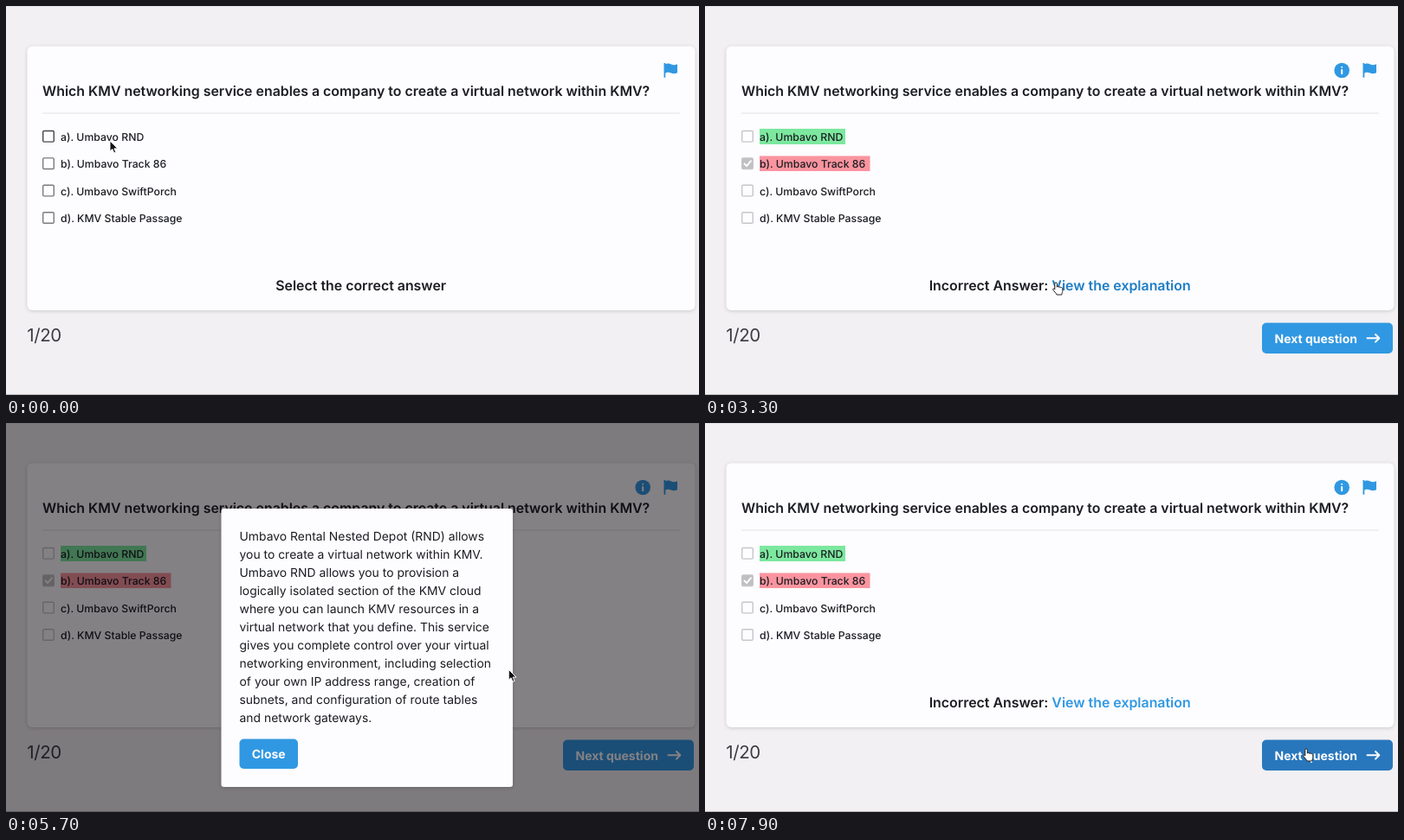
Write an HTML page that moves like this. It is 800 px wide and 450 px high and loops after 8 s.

```html
<!DOCTYPE html>
<html lang="en">
<head>
<meta charset="utf-8">
<title>Quiz</title>
<style>
html, body { margin: 0; height: 100%; overflow: hidden; background: #f2f0f3; }
svg { display: block; width: 100vw; height: 100vh; }
text { font-family: Inter, sans-serif; fill: #1b1d22; text-rendering: geometricPrecision; white-space: pre; }
.heading { font-size: 15.9px; font-weight: 600; }
.option { font-size: 12.25px; font-weight: 500; }
.body { font-size: 13.92px; }
.label { font-size: 14px; font-weight: 700; fill: #fdfcfe; }
.count { font-size: 20.5px; letter-spacing: -.02em; fill: #3c3c40; }
.blue { fill: #3098e2; }
.card { fill: #fdfcfe; filter: drop-shadow(0 1px 2px rgba(0, 0, 0, .16)); }
.mid { text-anchor: middle; }
.box { fill: #fdfcfe; stroke-width: 1.4; }
.line { fill: none; stroke: #fdfcfe; stroke-width: 2; stroke-linecap: round; stroke-linejoin: round; }
</style>
</head>
<body>
<svg viewBox="0 0 800 450">
  <rect width="800" height="450" fill="#f2f0f3"/>
  <path d="M0 .5H800" stroke="#e4e2e5"/>
  <path d="M0 449.5H800" stroke="#b9b7ba"/>
  <rect class="card" x="24.5" y="46.5" width="771" height="305.5" rx="6"/>
  <path class="blue" d="M759.5 66h1.8v1.2c3-1.2 4.8-.6 6.7.3 2.4 1 4.500.8 7-.3v10c-2.800 1.300-4.800 1.300-7.200.4-2.200-.9-4-1.100-6.500-.2v5.400h-1.800z"/>
  <text class="heading" x="42" y="103.600">Which KMV networking service enables a company to create a virtual network within KMV?</text>
  <path d="M42 124H778" stroke="#e3e1e5"/>
  <g id="marks">
    <rect x="63" y="142" width="99" height="18" fill="#7ce89e"/>
    <rect x="63" y="173.500" width="127.500" height="17.500" fill="#fa949f"/>
  </g>
  <g id="options"></g>
  <text id="prompt" class="heading mid" x="409.700" y="328.600">Select the correct answer</text>
  <text class="count" x="24.300" y="388">1/20</text>
  <g id="answered">
    <circle class="blue" cx="735.200" cy="74.500" r="8.800"/>
    <path class="line" d="M735.200 74v4.200M735.200 70.700v.1"/>
    <text class="heading mid" x="409.700" y="328.600">Incorrect Answer: <tspan id="link">View the explanation</tspan></text>
    <rect id="next" x="643" y="366.500" width="151" height="35.500" rx="5"/>
    <text class="label" x="657.500" y="389.500">Next question</text>
    <path class="line" d="M764.500 384.300H778M774 380l4.300 4.300-4.300 4.300"/>
  </g>
  <g id="modal">
    <rect width="800" height="450" fill="#050205" opacity=".49"/>
    <rect class="card" x="248.500" y="99" width="336.500" height="322" rx="3"/>
    <g id="explanation"></g>
    <rect class="blue" x="269.500" y="365.500" width="67.500" height="34.500" rx="5"/>
    <text class="label mid" x="303.200" y="388">Close</text>
  </g>
  <g id="cursor">
    <path id="arrow" d="M0 0V12.200l2.800-2.600 2 4.500 2.100-.9-2-4.300h3.900z" fill="#111" stroke="#fff"/>
    <path id="hand" d="M-1.200 8V1.200a1.300 1.300 0 0 1 2.600 0V5.200a1.200 1.200 0 0 1 2.300.3a1.200 1.200 0 0 1 2.200.5a1.100 1.100 0 0 1 1.900.9V9.500c0 2-.9 2.400-1 4.500H1c-.5-2-3-3.500-4.200-5.800c-.5-1.200.8-1.900 2-.2z" fill="#fff" stroke="#222"/>
    <path id="beam" d="M-2.500-6Q0-6 0-4V4Q0 6-2.500 6M2.500-6Q0-6 0-4V4Q0 6 2.500 6M-1.500 2h3" fill="none" stroke="#333" stroke-width=".7"/>
  </g>
</svg>
<script>
const $ = id => document.getElementById(id);
const show = (id, on) => $(id).setAttribute('display', on ? 'inline' : 'none');

const LOOP = 8000, ANSWER = 2200, OPEN = 4700, CLOSE = 7000;

$('options').innerHTML = [
  'a). Umbavo RND', 'b). Umbavo Track 86', 'c). Umbavo SwiftPorch', 'd). KMV Stable Passage'
].map((label, i) => {
  const y = 151 + 31.4 * i;
  return `<rect class="box" x="42.700" y="${y - 6.5}" width="12.600" height="12.600" rx="1.300"/>
    <text class="option" x="63" y="${y + 5}">${label}</text>`;
}).join('') + '<path id="check" class="line" d="M45.500 182.500l2.600 2.600 4.800-5.800"/>';
const boxes = [...document.querySelectorAll('.box')];

$('explanation').innerHTML = [
  'Umbavo Rental Nested Depot (RND) allows',
  'you to create a virtual network within KMV.',
  'Umbavo RND allows you to provision a',
  'logically isolated section of the KMV cloud',
  'where you can launch KMV resources in a',
  'virtual network that you define. This service',
  'gives you complete control over your virtual',
  'networking environment, including selection',
  'of your own IP address range, creation of',
  'subnets, and configuration of route tables',
  'and network gateways.'
].map((line, i) => `<text class="body" x="269.500" y="${135.6 + 21.03 * i}">${line}</text>`).join('');

// Pointer stops: time, x, y
const stops = [
  [0, 120, 156], [1800, 51, 183], [2200, 51, 183], [3100, 405, 320], [3300, 405, 320],
  [4500, 442, 315], [4800, 442, 315], [6300, 655, 269], [7000, 655, 269],
  [7800, 694, 377], [LOOP, 694, 377]
];

function pointerAt(t) {
  const i = stops.findIndex(s => s[0] > t);
  const [t0, x0, y0] = stops[i - 1], [t1, x1, y1] = stops[i];
  const p = (t - t0) / (t1 - t0), k = p * p * (3 - 2 * p);
  return [x0 + (x1 - x0) * k, y0 + (y1 - y0) * k];
}

function draw(now) {
  const t = now % LOOP, [x, y] = pointerAt(t);
  const within = (l, top, r, b) => x >= l && x <= r && y >= top && y <= b;
  const answered = t >= ANSWER, modal = t >= OPEN && t < CLOSE;
  const free = answered && !modal;
  const onLink = free && within(400, 313, 561, 334);
  const onNext = free && within(643, 366, 794, 402);
  const onText = modal && within(269, 120, 562, 352);

  for (const id of ['marks', 'answered', 'check']) show(id, answered);
  show('prompt', !answered);
  show('modal', modal);

  boxes.forEach((box, i) => {
    const hover = i === (y < 167 ? 0 : 1);
    box.style.stroke = answered ? '#c6c5c8' : hover ? '#48484b' : '#7b7a7d';
    box.style.fill = answered && i === 1 ? '#c0bfc2' : '';
  });
  $('link').style.fill = onLink ? '#1d7dc4' : '#3098e2';
  $('next').style.fill = onNext ? '#2877bd' : '#3098e2';

  show('hand', onLink || onNext);
  show('beam', onText);
  show('arrow', !onLink && !onNext && !onText);
  $('cursor').setAttribute('transform', `translate(${x} ${y})`);
}

const start = performance.now();
function tick() {
  draw(performance.now() - start);
  requestAnimationFrame(tick);
}
tick();
</script>
</body>
</html>
```
